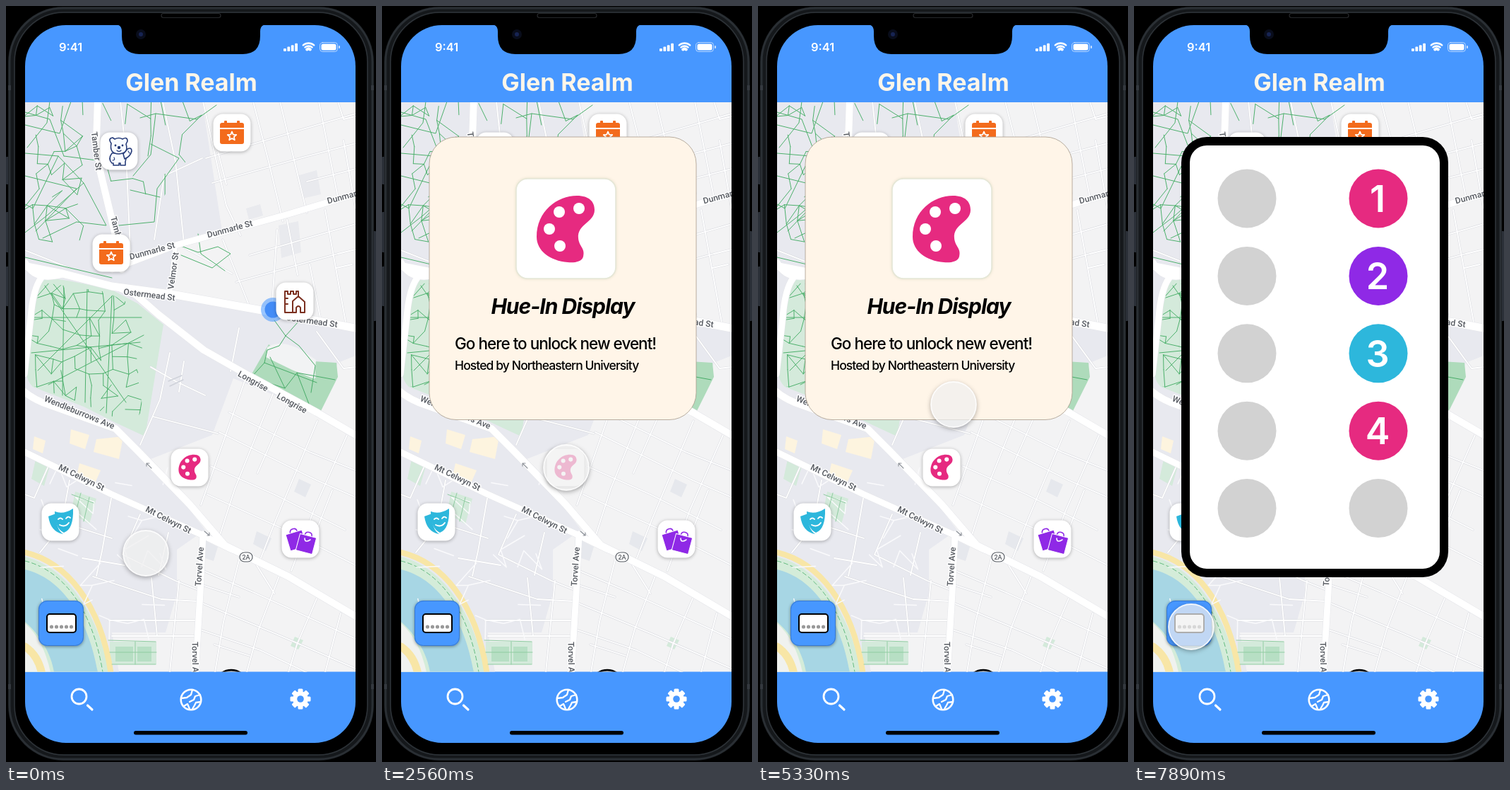
An HTML page with a canvas that plays this animation: 524 by 1068 pixels, repeating every 8 s.

```html
<!DOCTYPE html>
<html lang="en">
<head>
<meta charset="utf-8">
<title>Map prototype</title>
<style>
html, body { margin: 0; width: 100%; height: 100%; overflow: hidden; background: #000; }
canvas { display: block; width: 524px; height: 1068px; }
</style>
</head>
<body>
<canvas id="stage" width="524" height="1068"></canvas>
<script>
const W = 524, H = 1068, LOOP = 8000, STEP = LOOP / 72;
const BLUE = '#4797ff', PINK = '#e62a80', PURPLE = '#8f29e6', CYAN = '#2db7dc', ORANGE = '#f36b1c';
const stage = document.getElementById('stage').getContext('2d');
const still = document.createElement('canvas');
still.width = W;
still.height = H;
let c = still.getContext('2d');

function fill(shape, color) {
  c.fillStyle = color;
  c.fill(typeof shape === 'string' ? new Path2D(shape) : shape);
}
function line(shape, color, width) {
  c.strokeStyle = color;
  c.lineWidth = width;
  c.stroke(typeof shape === 'string' ? new Path2D(shape) : shape);
}
function box(x, y, w, h, r = 0) {
  const p = new Path2D();
  p.roundRect(x, y, w, h, r);
  return p;
}
function disc(x, y, r) {
  const p = new Path2D();
  p.arc(x, y, r, 0, 7);
  return p;
}
function at(x, y, draw, scale = 1, turn = 0) {
  c.save();
  c.translate(x, y);
  c.rotate(turn * Math.PI / 180);
  c.scale(scale, scale);
  draw();
  c.restore();
}
function shaded(color, blur, dy, draw) {
  c.save();
  c.shadowColor = color;
  c.shadowBlur = blur;
  c.shadowOffsetY = dy;
  draw();
  c.restore();
}
function clipped(shape, draw) {
  c.save();
  c.clip(typeof shape === 'string' ? new Path2D(shape) : shape);
  draw();
  c.restore();
}
function text(str, x, y, font, color, align = 'left', spacing = 0) {
  c.font = font;
  c.fillStyle = color;
  c.textAlign = align;
  c.letterSpacing = spacing + 'px';
  c.fillText(str, x, y);
  c.letterSpacing = '0px';
}
function random(seed) {
  return () => {
    seed = (seed * 16807) % 2147483647;
    return seed / 2147483647;
  };
}

// Irregular web of footpaths on a jittered grid.
function mesh(x0, y0, x1, y1, gap, keep, seed) {
  const rnd = random(seed), p = new Path2D(), rows = [];
  for (let y = y0; y <= y1; y += gap) {
    const row = [];
    for (let x = x0; x <= x1; x += gap) row.push([x + (rnd() - .5) * gap * .6, y + (rnd() - .5) * gap * .6]);
    rows.push(row);
  }
  rows.forEach((row, j) => row.forEach((a, i) => {
    for (const [di, dj, odds] of [[1, 0, keep], [0, 1, keep], [1, 1, keep * .3], [-1, 1, keep * .25]]) {
      const b = rows[j + dj]?.[i + di];
      if (rnd() < odds && b) {
        p.moveTo(...a);
        p.lineTo(...b);
      }
    }
  }));
  return p;
}

function label(str, x, y, turn) {
  at(x, y, () => {
    c.font = '500 12px Roboto, sans-serif';
    c.textAlign = 'center';
    c.strokeStyle = 'rgba(255,255,255,.9)';
    c.lineWidth = 3;
    c.strokeText(str, 0, 4);
    c.fillStyle = '#555960';
    c.fillText(str, 0, 4);
  }, 1, turn);
}

function drawGround() {
  fill(box(27, 135, 468, 806), '#f3f3f4');
  const campus = '#e8e9ef';
  fill('M27 135H278L306 318L238 338L232 404L495 458V494L470 504L444 576L322 526L292 606L205 640L282 740L242 768V830L226 885H150L160 941H27Z', campus);
  fill('M386 310L414 304L418 348L390 356ZM412 240L440 232L446 266L420 272ZM340 286L360 280L364 296L344 302Z', '#e9eaee');
  fill('M415 668L432 676L424 694L408 686ZM276 752L300 764L294 784L276 778ZM355 742L376 752L368 770L350 760Z', '#e6e8ed');
  const cream = '#fdf4df';
  fill('M92 598L118 606L112 626L90 618ZM128 612L166 608L160 640L124 630ZM40 608L56 614L52 632L38 626ZM104 646L134 656L126 674L100 664Z', cream);
  const mint = '#d4eadb';
  fill('M52 386Q58 380 150 401L186 420L223 450L197 608L158 590L110 566L38 538Q27 528 28 505L36 430Z', mint);
  fill('M42 640L62 650L54 678L36 668ZM98 686L128 696L118 732L92 716ZM147 898H213V930H147ZM409 891L421 896L414 909L403 904Z', mint);
  fill('M372 478L439 526L436 502L468 504L470 524L444 576L345 525Z', '#aedbbb');
  fill('M370 482Q390 470 420 487L439 500L437 527L405 514L368 496Z', '#f2f3f4');
  fill('M155 905H180V926H155ZM186 905H206V926H186Z', '#b7dfc4');

  // River and its banks
  fill('M27 778C82 792 128 850 146 941H27Z', '#d4ecd9');
  fill('M27 796C78 808 116 862 130 941H68C64 915 48 888 27 870Z', '#a7d6e4');
  fill('M27 872Q53 895 63 941H27Z', '#f0f2ef');
  line('M27 905Q46 918 51 944', '#f8e6a6', 11);
  line('M27 772C85 786 134 842 149 945', '#f8e6a6', 8);
  c.setLineDash([6, 4]);
  line('M27 784C80 797 122 850 137 941', '#62b97e', 1);
  c.setLineDash([]);
}

function drawMinorRoads() {
  const roads = [
    'M279 135L312 282L332 324M300 205L312 252M388 135L426 292M443 135L470 270M350 135L372 220L392 304M283 215L400 180L495 152M292 250L420 214L495 194M426 248L495 230M470 135L478 160L495 156M478 190L495 286',
    'M307 330L345 425M398 302L413 380M452 288L482 452M345 352L495 308M326 390L470 350L495 344M384 316L376 434M430 365L445 440M250 340L320 378M468 370L490 365',
    'M340 524L302 632L276 705M378 548L324 682L302 750M441 586L382 726L360 782M483 606L436 712L404 798M302 602L440 670L495 694M290 650L380 690L480 740M285 690L400 742L495 790M316 574L430 630L495 656M400 560L356 660M462 684L428 770',
    'M275 796L350 828L495 894M332 775L308 870L296 941M387 805L358 880L341 941M440 837L412 902L400 941M274 842L380 886L495 936M272 880L360 910L425 941M350 782L380 830M474 858L452 941M278 818L330 835M295 902L345 918',
    'M150 690L136 770L128 805M190 718L165 775L240 812L275 826M108 780L168 790M123 806L220 838L272 841M146 868H270M206 808L214 890M90 670L78 735L48 772M60 650L40 695L27 690M230 744L216 804M245 812L232 941M150 890H268M100 736L150 752',
    'M205 510L240 530L282 550M232 490L218 556L190 620M208 580L270 596L300 604M252 502L245 545M176 345L170 210L162 135M210 330L224 240L278 215M222 135L240 220L252 335M27 345L90 370M330 455L318 516M440 460L478 512L495 510'
  ];
  for (const road of roads) line(road, '#dcdde2', 3);
  for (const road of roads) line(road, '#fff', 1.8);
  line(mesh(55, 650, 240, 890, 24, .15, 73), '#fafafc', 1.5);
  line('M230 530L249 522M232 537L251 528', '#cfd2da', 1.5);
}

function drawFootpaths() {
  const green = '#4db06c';
  clipped('M27 135H284L250 232L190 316L145 320L130 365L27 360Z', () => {
    line(mesh(20, 138, 110, 340, 21, .4, 91), green, 1);
    line(mesh(145, 135, 280, 315, 27, .22, 43), green, 1);
  });
  line('M27 208L74 212L110 250L58 296L27 320M27 150L62 160L82 212M62 135L58 165L30 200M74 212L38 286L27 280M110 250L142 310L100 305L52 328M82 212L128 218M27 240L100 258L42 318M92 135L76 180L27 168M27 355L150 384', green, 1);
  line('M190 158L212 152L270 160L298 140M212 152L205 210L180 240M205 195L245 215L214 258L210 305L160 310M176 260L218 270M245 338L272 348L300 340L318 350L292 370L248 352M272 322L276 350L310 374', green, 1);
  clipped('M48 390L142 404L190 428L218 456L186 520L194 570L178 592L110 562L34 535L30 505Z', () => {
    line(mesh(28, 390, 205, 600, 18, .5, 29), green, 1);
    line('M40 440L192 440M45 515L160 400M55 395L170 560M115 397L112 560M150 410L142 575M36 490L190 475M82 398L80 550M60 535L195 465', green, 1);
  });
  line('M380 444L396 466L414 446M396 466L387 480L370 486L366 504L346 526M396 466L415 480L438 508L432 546M374 496L395 540L412 518L432 570M395 540L346 524M412 518L466 528M366 504L440 532', '#48ac68', 1);
  line('M93 690L124 702M106 688L98 718M118 694L110 728M145 896L212 898M147 913H213M183 898V930M150 930H212', '#8fcca1', 1);
}

function drawRoads() {
  const roads = [
    ['M130 130L128 190L134 236L153 315L164 372', 10],
    ['M150 372L240 338L400 294L500 264', 9],
    ['M20 366L80 378L150 396L240 408L385 434L500 456', 11],
    ['M27 362Q40 390 80 379M50 384Q38 400 35 440L26 520', 9],
    ['M160 398L184 408L216 436L280 486L340 520L440 574L500 609', 10],
    ['M240 338L232 406', 6],
    ['M20 540Q38 556 60 563L155 597L188 630L260 704L310 762L400 806L500 865', 10],
    ['M20 627L150 690L275 746L320 768', 9],
    ['M279 746L275 830L268 945', 9]
  ];
  for (const [road, width] of roads) line(road, '#e4e5e9', width + 1);
  for (const [road, width] of roads) line(road, '#fff', width);
  line('M206 653L199 646M199 650V646H203M288 748L281 742M285 748H288V744', '#8b9097', 1.1);
}

function drawLabels() {
  label('Tamber St', 128, 205, 83);
  label('Tamber St', 159, 324, 75);
  for (const [x, y] of [[317, 315], [207, 346], [487, 267]]) label('Dunmarle St', x, y, -15);
  label('Velmor St', 237, 374, -82);
  label('Ostermead St', 203, 408, 7);
  label('Ostermead St', 433, 445, 8);
  label('Longrise', 350, 530, 29);
  label('Longrise', 405, 561, 29);
  label('Wendleburrows Ave', 104, 574, 22);
  label('Mt Celwyn St', 107, 666, 26);
  label('Mt Celwyn St', 230, 726, 27);
  label('Torvel Ave', 274, 792, -86);
  label('Torvel Ave', 268, 926, 89);
  const shield = box(331, 772, 18, 13, 6.5);
  fill(shield, '#fff');
  line(shield, '#5b6067', 1.2);
  text('2A', 340, 782, '500 9px Roboto, sans-serif', '#555960', 'center');
}

function palette() {
  fill('M-41 10C-41 -26 -12 -48 16 -48C34 -48 41 -39 41 -28C41 -10 16 -8 18 12C19 24 28 26 25 38C23 46 11 47 3 46C-22 44 -41 30 -41 10Z', PINK);
  for (const [x, y] of [[19, -30], [-9, -25], [-23, -1], [-8, 23]]) fill(disc(x, y, 8), '#fff');
}
function calendar() {
  fill(box(-17, -14, 34, 7, [3, 3, 0, 0]), ORANGE);
  fill(box(-11, -17, 4, 6, 1), ORANGE);
  fill(box(7, -17, 4, 6, 1), ORANGE);
  fill(box(-17, -5, 34, 21, [0, 0, 3, 3]), ORANGE);
  const star = new Path2D();
  for (let i = 0; i < 10; i++) {
    const r = i % 2 ? 3 : 6.5, a = i * Math.PI / 5;
    star.lineTo(r * Math.sin(a), 5 - r * Math.cos(a));
  }
  star.closePath();
  line(star, '#fff', 1.8);
}
function castle() {
  line('M-3 16H-14V-14H-10V-10H-6V-14H-2V-10H2V-14H5V-7M-3 16V0L5 -7L14 1V16H8V9Q5 5 2 9V16ZM-14 -4H-10M-14 4H-10', '#7b3020', 2);
}
function bear() {
  const ink = '#263b78';
  const parts = [
    'M-10 3Q-16 11 -10 17H-8V20H0V17H2V20H9V15Q12 7 6 2Z',
    'M6 4L12 -3Q18 -6 18 0Q16 8 8 11Z',
    'M-11 -11Q-16 -18 -9 -19L-6 -17Q0 -20 5 -17Q12 -21 12 -14L10 -10Q14 3 0 4Q-14 4 -11 -11Z'
  ];
  for (const part of parts) {
    fill(part, '#f8fbff');
    line(part, ink, 1.6);
  }
  for (const x of [-5, 5]) fill(disc(x, -8, 1.4), ink);
  fill(disc(0, -5, 2.2), ink);
  line('M-3 -1Q0 2 3 -1M13 0L15 3M-7 9Q-5 13 -9 13', ink, 1.2);
}
function masks() {
  fill('M-17 -8L-6 -12Q-7 10 4 17Q-14 14 -17 -8Z', CYAN);
  fill('M-8 -15Q4 -10 18 -19Q19 10 5 15Q-8 9 -8 -15Z', CYAN);
  line('M-3 -4Q0 -7 3 -4M8 -5Q11 -9 14 -6M-1 4Q7 8 12 1', '#fff', 1.8);
}
function bags() {
  const bag = (x, y, turn) => at(x, y, () => {
    line('M-5 -12Q-5 -17 0 -17Q5 -17 5 -12', PURPLE, 1.6);
    fill(box(-12, -12, 24, 24, 1), PURPLE);
    line('M-12 -12H12V12H-12Z', '#fff', 1);
  }, 1, turn);
  bag(-6, 2, -17);
  bag(8, 7, 15);
  line('M6 -1Q6 6 14 1', '#fff', 1.5);
}

function tile(x, y, icon, scale) {
  shaded('rgba(0,0,0,.3)', 5, 1, () => fill(box(x - 26.5, y - 26.5, 53, 53, 14), '#fff'));
  at(x, y, icon, scale);
}

function drawPins() {
  fill(disc(378, 429, 17), 'rgba(71,151,255,.55)');
  fill(disc(378, 429, 11.5), '#438cf7');
  tile(160, 205, bear);
  tile(320, 179, calendar);
  tile(149, 349, calendar);
  tile(409, 417, castle);
  tile(260, 652, palette, .38);
  tile(77, 729, masks);
  tile(417, 753, bags);
  shaded('rgba(0,0,0,.4)', 4, 1, () => fill(box(46, 840, 64, 64, 12), BLUE));
  line(box(46.5, 840.5, 63, 63, 12), '#3778cf', 1);
  fill(box(58, 859, 41, 26, 4), '#fff');
  line(box(58, 859, 41, 26, 4), '#000', 2);
  for (let i = 0; i < 5; i++) fill(disc(64.5 + i * 7, 877, 2.6), '#999');
  fill(disc(319, 962, 24), '#aaa');
  line(disc(319, 962, 24), '#000', 2.5);
}

function drawStatus() {
  text('9:41', 75, 64, '600 16.5px Inter, sans-serif', '#fff');
  for (let i = 0; i < 4; i++) fill(box(393 + i * 5.4, 60 - i * 2.4, 3.8, 4 + i * 2.4, 1), '#fff');
  for (const r of [4, 8, 12]) {
    const arc = new Path2D();
    arc.arc(428.5, 64, r - .5, -2.3, -.84);
    line(arc, '#fff', r === 4 ? 4 : 2.5);
  }
  line(box(444.5, 51.5, 25, 13, 4), 'rgba(255,255,255,.6)', 1);
  fill(box(446.5, 53.5, 21, 9, 2.5), '#fff');
  fill(box(471, 56, 2, 4, 1), 'rgba(255,255,255,.7)');
}

function drawFooter() {
  line(disc(103.5, 975.5, 10.5), '#fff', 2.8);
  line('M115.5 988L122 994', '#fff', 3.2);
  line(disc(262, 980, 14.3), '#fff', 2.6);
  line('M248 978L256 977L262 973L264 966M275 973L268 975L266 980L260 983M276 983L269 984L267 988L264 993M252 989L257 986L260 993', '#fff', 2.3);
  at(417, 979, () => {
    for (let i = 0; i < 8; i++) at(0, 0, () => fill(box(-3.5, -14.5, 7, 10, 1.5), '#fff'), 1, i * 45);
    fill(disc(0, 0, 10.8), '#fff');
    fill(disc(0, 0, 4.8), BLUE);
  });
  fill(box(181, 1024, 161, 5.5, 3), '#000');
}

function drawPhone() {
  fill(box(0, 0, W, H), '#000');
  for (const [x, y, h] of [[0, 213, 39], [0, 291, 57], [0, 368, 56], [520, 318, 127]]) fill(box(x, y, 4, h, 1), '#2b3038');
  fill(box(3, 1, 518, 1065, 78), '#15181b');
  line(box(5, 3, 514, 1061, 76), '#2a2f34', 3);
  line(box(12, 9, 500, 1049, 70), '#2e3338', 1.5);
  fill(box(13, 10, 498, 1047, 69), '#000');
  for (const y of [112, 958]) for (const x of [3, 517]) fill(box(x, y, 4, 7), '#34393f');
  line(box(220, 10.5, 84, 6, 3), '#26282b', 1.2);
}

function drawStill() {
  c.lineJoin = c.lineCap = 'round';
  drawPhone();
  clipped(box(27, 27, 468, 1014, 58), () => {
    fill(box(27, 27, 468, 1014), BLUE);
    clipped(box(27, 136, 468, 804.5), () => {
      drawGround();
      drawMinorRoads();
      drawFootpaths();
      drawRoads();
      drawLabels();
      drawPins();
    });
    fill('M154 26Q164 26 164 36V42Q164 68 189 68H335Q360 68 360 42V36Q360 26 370 26Z', '#000');
  });
  fill(disc(191, 40, 7), '#090d1b');
  fill(disc(191, 40, 3), '#172452');
  drawStatus();
  text('Glen Realm', 262.5, 120, '700 34px Inter, sans-serif', '#fff6e9', 'center');
  drawFooter();
}

function drawCard() {
  const card = box(67, 185, 378, 399.5, 38);
  fill(card, '#fff5e8');
  line(card, '#a89b8c', .8);
  shaded('rgba(120,140,90,.3)', 4, 0, () => fill(box(190, 244, 141, 141, 16), '#fff'));
  line(box(190, 244, 141, 141, 16), '#e5e7d7', 1.6);
  at(260, 316, palette);
  text('Hue-In Display', 256, 435, 'italic 700 30px Inter, sans-serif', '#000', 'center', -1);
  text('Go here to unlock new event!', 103, 485, '500 22.5px Inter, sans-serif', '#000', 'left', -1);
  text('Hosted by Northeastern University', 103, 514, '500 17.5px Inter, sans-serif', '#000', 'left', -.9);
}

function drawSlots() {
  fill(box(67, 185, 378, 622, 36), '#000');
  fill(box(79, 197, 354, 598, 24), '#fff');
  [PINK, PURPLE, CYAN, PINK, '#d2d2d2'].forEach((color, i) => {
    const y = 272 + i * 109.4;
    fill(disc(160, y, 41.5), '#d2d2d2');
    fill(disc(346, y, 41.5), color);
    if (i < 4) text(i + 1, 345, y + 19, '600 52px Inter, sans-serif', '#fff', 'center');
  });
}

const easeIn = s => s * s;
const easeOut = s => 1 - (1 - s) ** 2;
const easeBoth = s => s * s * (3 - 2 * s);
// Start, end, destination and easing of each pointer move.
const moves = [
  [0, 900, 261, 652, easeBoth],
  [4300, 5050, 277, 563, easeBoth],
  [5650, 6000, 251, 636, easeIn],
  [6000, 6750, 81, 877, easeOut]
];
function pointerAt(t) {
  let x = 198, y = 773;
  for (const [start, end, toX, toY, ease] of moves) {
    const s = ease(Math.min(1, Math.max(0, (t - start) / (end - start))));
    x += (toX - x) * s;
    y += (toY - y) * s;
  }
  return [x, y];
}

function drawPointer(x, y) {
  // Shadow only outside the translucent disc
  const outside = box(x - 60, y - 60, 120, 120);
  outside.addPath(disc(x, y, 32));
  c.save();
  c.clip(outside, 'evenodd');
  shaded('rgba(0,0,0,.38)', 7, 2, () => fill(disc(x, y, 32), '#fff'));
  c.restore();
  fill(disc(x, y, 32), 'rgba(240,240,240,.72)');
  line(disc(x, y, 32), 'rgba(255,255,255,.85)', 1.8);
}

function frame(now) {
  const t = Math.floor((now % LOOP) / STEP) * STEP;
  c.drawImage(still, 0, 0);
  if (t >= 1000 && t < 5550) drawCard();
  if (t >= 7200) drawSlots();
  drawPointer(...pointerAt(t));
  requestAnimationFrame(frame);
}

drawStill();
c = stage;
c.lineJoin = c.lineCap = 'round';
requestAnimationFrame(frame);
</script>
</body>
</html>
```
